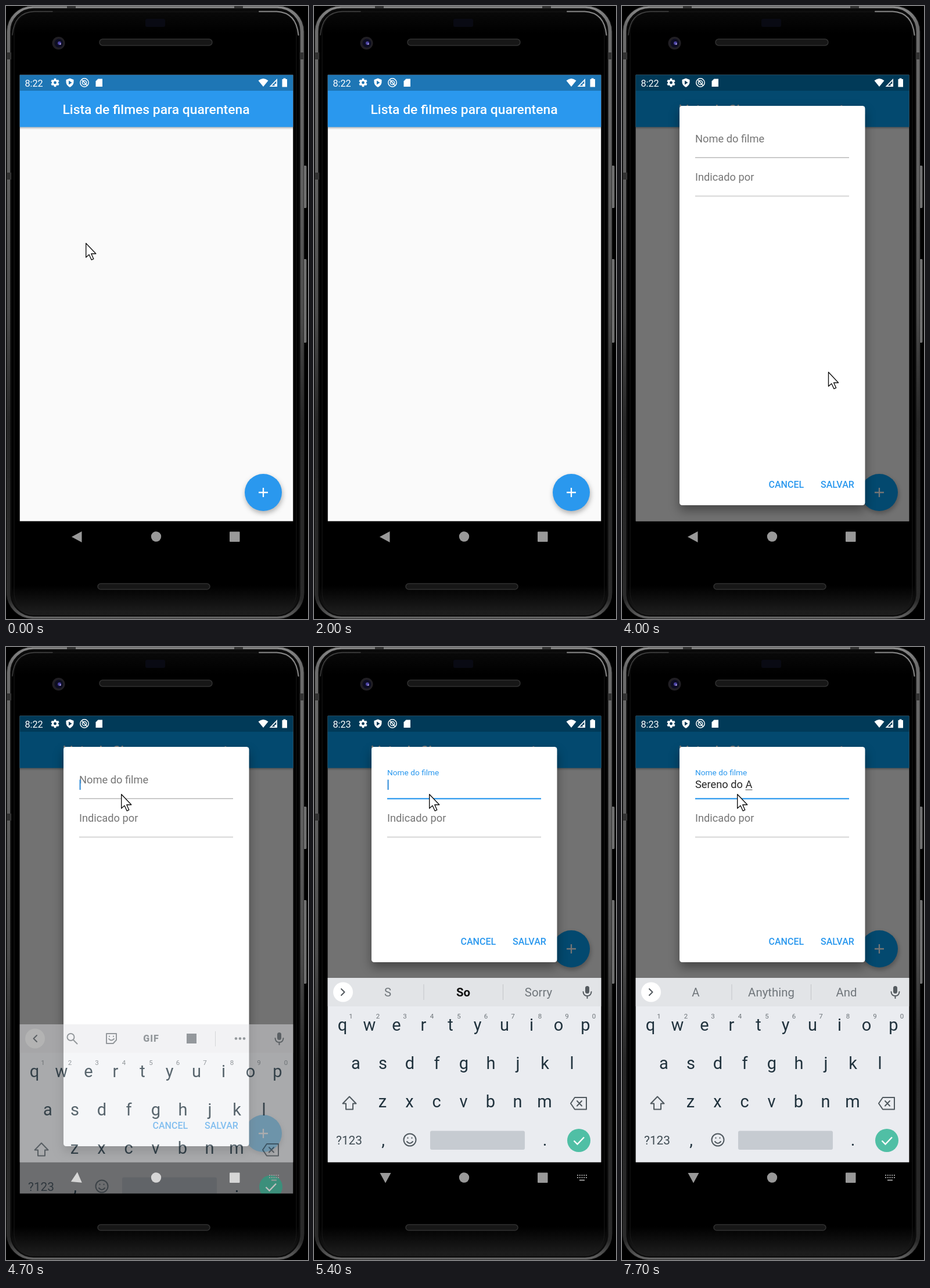
These frames come from a looping animation (520 by 1056 pixels, 8000 ms). An HTML page:

```html
<!DOCTYPE html>
<html lang="pt">
<head>
<meta charset="utf-8">
<title>Lista de filmes</title>
<style>
  html, body { margin: 0; width: 100%; height: 100%; overflow: hidden; background: #000; }
  svg { display: block; width: 100vw; height: 100vh; font-family: Roboto, "Noto Sans", sans-serif; }
  text { white-space: pre; }
  .mid { text-anchor: middle; }
  .line { fill: none; stroke-linecap: round; stroke-linejoin: round; }
  #fab { filter: drop-shadow(1px 4px 4px rgba(0,0,0,.3)); }
  #box { filter: drop-shadow(0 9px 9px rgba(0,0,0,.38)); }
  .key { font-size: 29px; fill: #20323d; }
  .digit { font-size: 11.5px; fill: #6c7378; }
  .word { font-size: 20.4px; fill: #70767b; }
  .button { font-size: 16px; font-weight: 500; fill: #2a98ee; }
  .input { font-size: 18.28px; }
</style>
</head>
<body>
<svg viewBox="0 0 520 1056" preserveAspectRatio="none">
  <defs>
    <linearGradient id="rim" x2="0" y2="1">
      <stop offset="0" stop-color="#8a8a8a"/>
      <stop offset=".03" stop-color="#6c6c6c"/>
      <stop offset=".28" stop-color="#606060"/>
      <stop offset=".5" stop-color="#4c4c4c"/>
      <stop offset=".68" stop-color="#262626"/>
      <stop offset=".97" stop-color="#2a2a2a"/>
      <stop offset="1" stop-color="#666"/>
    </linearGradient>
    <linearGradient id="glass" x2="0" y2="1">
      <stop offset="0" stop-color="#0a0a0a"/>
      <stop offset=".04" stop-color="#000"/>
      <stop offset=".95" stop-color="#000"/>
      <stop offset="1" stop-color="#202020"/>
    </linearGradient>
    <linearGradient id="side">
      <stop offset="0" stop-color="#333"/>
      <stop offset=".5" stop-color="#8c8c8c"/>
      <stop offset="1" stop-color="#333"/>
    </linearGradient>
    <linearGradient id="shade" x2="0" y2="1">
      <stop offset="0" stop-opacity=".28"/>
      <stop offset="1" stop-opacity="0"/>
    </linearGradient>
    <clipPath id="screen"><rect x="23.5" y="118.5" width="471" height="823"/></clipPath>
  </defs>

  <!-- phone body -->
  <rect width="520" height="1056"/>
  <rect x="511" y="275" width="7" height="73" rx="2" fill="url(#side)"/>
  <rect x="511" y="436" width="7" height="144" rx="2" fill="url(#side)"/>
  <rect x="1.5" y="0" width="511.5" height="1055.5" rx="44" fill="url(#rim)" stroke="#2a2a2a"/>
  <rect x="8.5" y="5" width="497" height="1045.5" rx="39" fill="url(#glass)" stroke="#0c0c0c" stroke-width="2.5"/>
  <rect x="14" y="10" width="486" height="1036" rx="35" fill="none" stroke="#191919"/>
  <path class="line" d="M436 9.5H466Q500 11 503.5 50" stroke="#8a8a8a" stroke-width="2"/>
  <path class="line" d="M80 9.5H48Q14 11 11 50" stroke="#444" stroke-width="1.4"/>
  <g fill="#333">
    <rect x="2" y="80" width="7" height="12"/><rect x="2" y="287" width="7" height="12"/>
    <rect x="506" y="80" width="6" height="12"/>
    <rect x="105" width="15" height="4"/><rect x="393" width="15" height="4"/>
  </g>
  <rect x="240" y="22" width="34" height="14" rx="3" fill="#090a13"/>
  <g fill="#171717" stroke="#303030" stroke-width="1.5">
    <rect x="161" y="57" width="194" height="11" rx="5.5"/>
    <rect x="158" y="995" width="193" height="10" rx="5"/>
  </g>
  <circle cx="90.5" cy="64" r="11" fill="#211f24"/>
  <circle cx="91" cy="64" r="7.5" fill="#0d0d22"/>
  <circle cx="92" cy="64" r="3" fill="#4a42a0"/>
  <circle cx="93.5" cy="65.5" r="1.2" fill="#b9a8e8"/>

  <g clip-path="url(#screen)">
    <!-- list page -->
    <rect x="23.5" y="118.5" width="471" height="769" fill="#fafafa"/>
    <rect x="23.5" y="208" width="471" height="5" fill="url(#shade)"/>
    <rect id="bar" x="23.5" y="146" width="471" height="62.5"/>
    <rect id="status" x="23.5" y="118.5" width="471" height="27.5"/>
    <text class="mid" x="258.5" y="186" font-size="22.85" font-weight="500" fill="#fff">Lista de filmes para quarentena</text>
    <g id="fab">
      <circle cx="443" cy="838" r="32"/>
      <path d="M435 838H451M443 830V846" stroke="#fff" stroke-width="2.3"/>
    </g>

    <!-- dialog -->
    <g id="dialog">
      <rect x="23.5" y="118.5" width="471" height="769" fill-opacity=".54"/>
      <rect id="box" x="99" y="172" width="319.5" rx="4.5" fill="#fff"/>
      <text id="label" x="126">Nome do filme</text>
      <text class="input" x="126" y="301" fill="#757575">Indicado por</text>
      <rect id="rule" x="126" width="265"/>
      <rect x="126" y="326.3" width="265" height="2.4" fill="#dcdcdc"/>
      <text class="input" id="typed" x="126" y="243" fill="#262626"></text>
      <rect id="compose" y="245.5" height="1" fill="#444"/>
      <rect id="caret" y="228.5" width="2.2" height="17.5" fill="#3d93dc"/>
      <g id="actions">
        <text class="button" x="252.5" y="512.5">CANCEL</text>
        <text class="button" x="342" y="512.5">SALVAR</text>
      </g>
    </g>

    <!-- status icons -->
    <g fill="#fff">
      <text id="clock" x="32.5" y="138.5" font-size="16.2"></text>
      <g id="gear"><circle cx="84.5" cy="132" r="4" fill="none" stroke="#fff" stroke-width="3.2"/></g>
      <path fill-rule="evenodd" d="M110 124.5L116.5 127V131.5Q116 137 110 140Q104 137 103.5 131.5V127ZM108 128.5V135.5L113.5 132Z"/>
      <g fill="none" stroke="#fff" stroke-width="1.5">
        <circle cx="135" cy="132" r="7.2"/><circle cx="135" cy="132" r="3.6"/>
        <path d="M131 127.5L139.5 137"/>
      </g>
      <path d="M158.5 125.5H166V139H154.5V129.5Z"/>
      <path d="M434.5 128.5Q443 121.5 451.5 128.5L443 139Z"/>
      <path fill-rule="evenodd" d="M467 125V139H453.5ZM465.3 129.2L457.6 137.3H462.5V134H465.3Z"/>
      <path d="M477.5 126V124.5H481.5V126H484V139.5H475.5V126Z"/>
    </g>

    <!-- keyboard -->
    <g id="keyboard">
      <g id="panel">
        <rect x="23.5" y="570" width="471" height="317.5" fill="#eaecf0"/>
        <rect x="23.5" y="570" width="471" height="49" fill="#e2e4e7"/>
        <circle cx="50" cy="594.5" r="17" fill="#fff"/>
      </g>
      <path id="chevron" class="line" stroke="#555b60" stroke-width="2"/>
      <g fill="#555b60">
        <rect x="467" y="584" width="7" height="13" rx="3.5"/>
        <path class="line" d="M463.5 594Q464 601 470.5 601Q477 601 477.5 594M470.5 601V605" stroke="#555b60" stroke-width="2"/>
      </g>
      <g id="tools" fill="#70767b">
        <g class="line" stroke="#70767b" stroke-width="2">
          <circle cx="111.5" cy="592" r="6"/><path d="M116 597L122.5 603.5"/>
          <path d="M173 586H190V597L184.5 603H173ZM177 595Q181 600 186 595M178 590.5V591M185 590.5V591"/>
        </g>
        <text class="mid" x="250" y="600" font-size="16" font-weight="900" letter-spacing="1">GIF</text>
        <rect x="311" y="586" width="17" height="17"/>
        <rect x="360" y="582" width="1" height="26" fill="#c4c7cb"/>
        <circle cx="396" cy="594.5" r="2.3"/><circle cx="403" cy="594.5" r="2.3"/><circle cx="410" cy="594.5" r="2.3"/>
      </g>
      <g id="words">
        <path d="M189 581V608M325.5 581V608" stroke="#c2c5c9"/>
        <text class="word mid" x="127" y="602"></text>
        <text class="word mid" x="257" y="602"></text>
        <text class="word mid" x="386.5" y="602"></text>
      </g>
      <g id="keys"></g>
      <g class="line" stroke="#50595f" stroke-width="2">
        <path d="M61 774.5L72.5 786.5H67V796.5H55V786.5H49.5Z"/>
        <path d="M449 776H469V796.5H449L442 786.2ZM453 782L461 790.5M461 782L453 790.5"/>
        <circle cx="165" cy="849" r="10.5"/>
        <path d="M160 852Q165 858 170 852M161.5 845.5V846M168.5 845.5V846"/>
      </g>
      <text class="mid" x="60.5" y="857" font-size="20.8" fill="#3e4a52">?123</text>
      <text class="key mid" x="119" y="859">,</text>
      <text class="key mid" x="397.5" y="859">.</text>
      <rect x="200" y="833.5" width="163" height="32.5" rx="3" fill="#54606e" fill-opacity=".24"/>
      <circle cx="456" cy="850" r="20" fill="#50bfa5"/>
      <path d="M447.5 850.5L453.5 856.5L465 844.5" fill="none" stroke="#fff" stroke-width="2.4"/>
    </g>
  </g>

  <!-- navigation -->
  <g id="nav" fill="#999">
    <path id="back" d="M113 914.5L130.5 905V924Z"/>
    <circle cx="258.5" cy="914" r="8.7"/>
    <rect x="385" y="905.5" width="17.5" height="17.5" rx="1"/>
    <g id="dots">
      <path d="M453 910H470M453 914H470" stroke="#999" stroke-width="2" stroke-dasharray="2 1.75"/>
      <path d="M457 918.5H466" stroke="#999" stroke-width="2"/>
    </g>
  </g>

  <path id="pointer" d="M.7 .7V25L6 20.3L10.2 29.3L13.8 27.7L9.8 18.8H17.8Z" fill="#fff" stroke="#111" stroke-width="1.4" stroke-linejoin="round"/>
</svg>

<script>
const LOOP = 8000, STEP = 100;
const $ = id => document.getElementById(id);
const set = (id, attrs) => { for (const k in attrs) $(id).setAttribute(k, attrs[k]); };
const show = (id, on) => { $(id).style.display = on ? '' : 'none'; };
const lerp = (a, b, p) => a + (b - a) * p;
const ramp = (t, from, to) => Math.min(1, Math.max(0, (t - from) / (to - from)));
const ease = p => p * p * (3 - 2 * p);

// static parts made from rules
const rows = [['qwertyuiop', 49, 661], ['asdfghjkl', 72, 727], ['zxcvbnm', 118, 793]];
$('keys').innerHTML = rows.map(([letters, x0, y], r) => [...letters].map((c, i) => {
  const x = x0 + i * 46.5;
  const digit = r ? '' : `<text class="digit mid" x="${x + 14.5}" y="639.5">${(i + 1) % 10}</text>`;
  return `<text class="key mid" x="${x}" y="${y}">${c}</text>${digit}`;
}).join('')).join('');
for (let a = 0; a < 360; a += 60)
  $('gear').innerHTML += `<rect x="82.7" y="124.8" width="3.6" height="4" transform="rotate(${a} 84.5 132)"/>`;

const phrase = 'Sereno do A';
const keyTimes = [5500, 5600, 5700, 5800, 6000, 6100, 6300, 6400, 6500, 6600, 7200];
const hints = ['S So Sorry', 'S So Sorry', 'Se See Send', 'Ser Set Server', 'Sere Were Here', 'Seren Seen Screen',
  'Sereno Serene Siren', 'do you it', 'd do did', 'do Do dog', 'areal you it', 'A Anything And'].map(s => s.split(' '));
const words = document.querySelectorAll('.word');

// pointer legs: start, end, from, to
const legs = [
  [0, 200, [137, 408], [137, 408]],
  [200, 500, [137, 408], [-24, 372]],
  [2200, 3000, [-2, 254], [440, 835]],
  [3000, 3600, [440, 835], [440, 835]],
  [3800, 4300, [440, 835], [198, 253]],
  [4300, LOOP, [198, 253], [198, 253]]
];

function drawPointer(t) {
  const leg = legs.find(([a, b]) => t >= a && t < b);
  show('pointer', leg);
  if (!leg) return;
  const [a, b, from, to] = leg, p = ease(ramp(t, a, b));
  set('pointer', { transform: `translate(${lerp(from[0], to[0], p)} ${lerp(from[1], to[1], p)})` });
}

function drawField(t) {
  const count = keyTimes.filter(k => k <= t).length;
  const text = phrase.slice(0, count);
  const word = text.slice(text.lastIndexOf(' ') + 1);
  const typed = $('typed');
  const endOf = s => {
    typed.textContent = s;
    return 126 + (s ? typed.getComputedTextLength() : 0);
  };
  const start = endOf(text.slice(0, text.length - word.length));
  const end = endOf(text);
  set('compose', { x: start, width: end - start });

  const last = count ? keyTimes[count - 1] : t >= 5400 ? 5400 : 4700;
  show('caret', t >= 4700 && (t - last) % 1000 < 500);
  set('caret', { x: end + .5 });

  const focus = ramp(t, 4700, 4900);
  set('label', {
    y: lerp(235, 221, focus),
    'font-size': lerp(18.28, 13.7, focus),
    fill: focus ? focus < 1 ? '#5087b2' : '#2a98ee' : '#757575'
  });
  set('rule', focus ? { y: 260.2, height: 2.2, fill: '#2a98ee' } : { y: 260.6, height: 1.2, fill: '#a8a8a8' });

  hints[count].forEach((w, i) => {
    const bold = i === 1 && count < 2;
    words[i].textContent = w;
    words[i].style.fontWeight = bold ? 700 : 400;
    words[i].style.fill = bold ? '#111' : '';
  });
}

function drawKeyboard(t) {
  const open = t >= 4700, sliding = open && t < 4800, typing = t >= 5400;
  const rise = t < 4800 ? 80 : t < 4900 ? 10 : 0;
  show('keyboard', open);
  set('keyboard', { transform: `translate(0 ${rise})`, opacity: sliding ? .75 : 1 });
  set('panel', { opacity: sliding ? .62 : 1 });
  show('tools', !typing);
  show('words', typing);
  set('chevron', { d: typing ? 'M47 589L52.5 594.5L47 600' : 'M53 589L47.5 594.5L53 600' });

  set('nav', { fill: sliding ? '#d6d6d6' : '#999' });
  set('back', { transform: `rotate(${!open ? 0 : sliding ? 95 : -90} 122.5 914)` });
  show('dots', open);

  const lift = t < 4800 ? 0 : 318;
  const shrink = t < 4800 ? 0 : t < 4900 ? 240 : 317;
  set('fab', { transform: `translate(0 ${-lift})` });
  set('box', { height: 688 - shrink });
  set('actions', { transform: `translate(0 ${317 - shrink})` });
}

function draw(t) {
  const modal = t >= 3800;
  const blue = modal ? '#079ff3' : '#2a98ee';
  show('dialog', modal);
  set('dialog', { opacity: t < 3900 ? .5 : 1 });
  set('bar', { fill: blue });
  set('fab', { fill: blue });
  set('status', { fill: modal ? '#027ec1' : '#1e76b5' });
  $('clock').textContent = t < 5000 ? '8:22' : '8:23';
  drawKeyboard(t);
  drawField(t);
  drawPointer(t);
}

let begin;
function tick(now) {
  begin ??= now;
  draw(Math.floor((now - begin) % LOOP / STEP) * STEP);
  requestAnimationFrame(tick);
}
draw(0);
requestAnimationFrame(tick);
</script>
</body>
</html>
```
